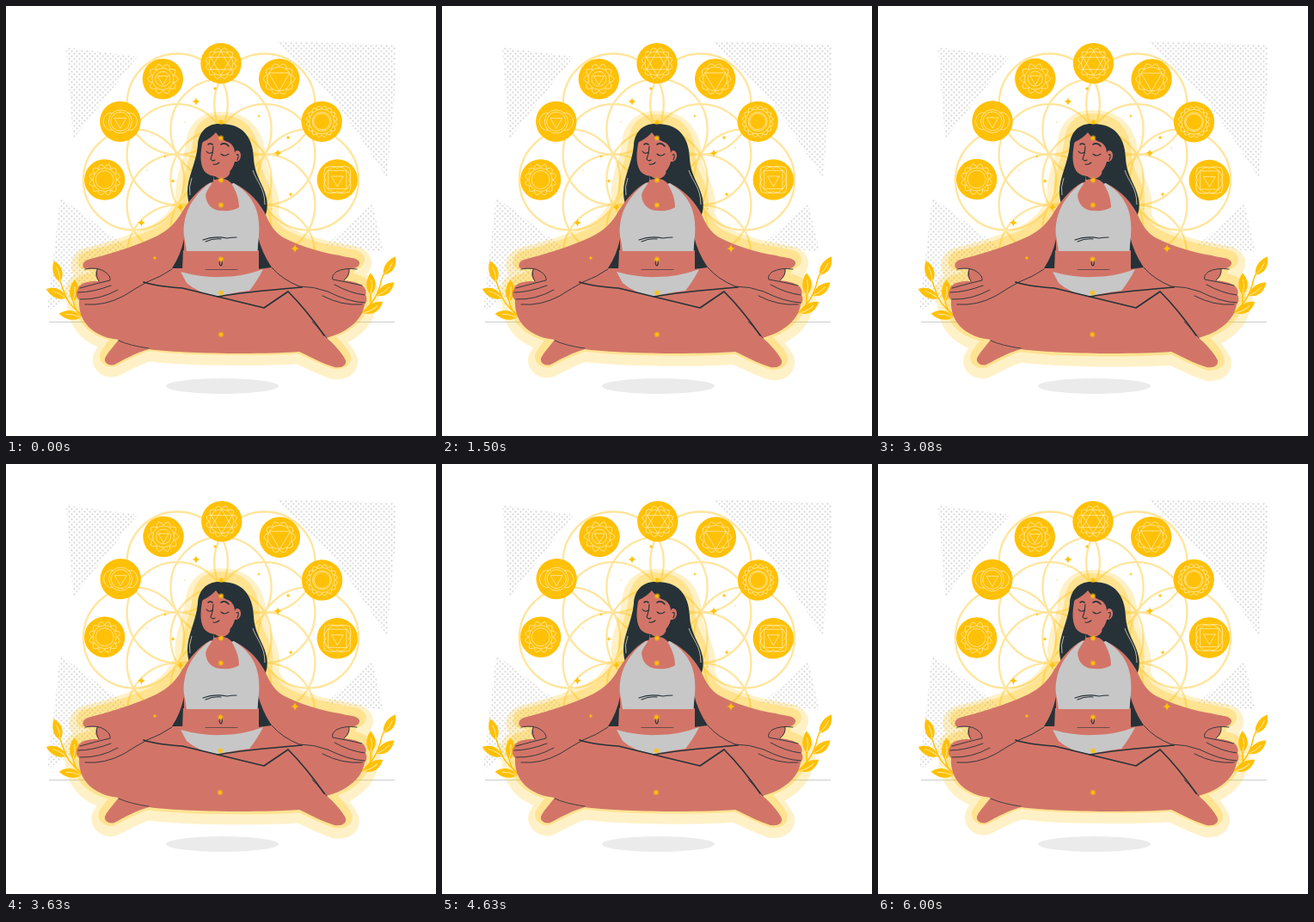
Animation of 500x500 px, one loop 6.04 s. Source, as an HTML page:

```html
<!DOCTYPE html>
<html lang="en">
<head>
<meta charset="utf-8">
<title>Meditation</title>
<style>
  html, body { margin: 0; width: 100%; height: 100%; overflow: hidden; background: #fff; }
  svg { display: block; width: 100%; height: 100%; }
  .line { fill: none; stroke: #263238; stroke-linecap: round; stroke-linejoin: round; }
</style>
</head>
<body>
<svg viewBox="0 0 500 500">
  <defs>
    <pattern id="dots" width="6" height="6" patternUnits="userSpaceOnUse">
      <circle cx="1.5" cy="1.5" r="1.15" fill="#dadada"/>
      <circle cx="4.5" cy="4.5" r="1.15" fill="#dadada"/>
    </pattern>
    <path id="hair" d="M250 137C233 136 224 147 223 162C221 183 211 199 211 216C211 228 216 238 215 250L296 252C303 246 305 234 303 224C300 208 289 198 288 177C287 151 274 137 250 137Z"/>
    <path id="body" d="M238 205C224 212 211 228 202 244C194 256 184 264 170 270C148 280 119 289 95 295C89 297 88 303 91 305C96 307 101 305 106 306C103 310 103 315 108 320C100 320 92 320 86 325C84 326 84 328 84 329C81 332 81 338 85 342C84 360 93 374 107 381C114 385 122 387 131 388C125 396 118 403 115 410C114 415 120 419 126 417C139 410 152 403 166 399C212 405 300 405 341 402C356 409 369 416 382 420C391 421 396 418 395 412C390 402 381 393 373 386C397 379 414 366 417 347C420 344 420 339 418 336C420 331 417 327 414 325C408 321 401 320 393 319C399 315 400 310 399 306C405 306 412 303 411 298C409 292 397 293 388 290C368 287 341 279 324 270C309 262 305 248 300 239C291 223 277 211 262 205Z"/>
    <g id="leaf">
      <path d="M0 0C-6-6-6-15-1-23C6-16 7-7 0 0Z" fill="#ffc107"/>
      <path d="M0-1Q2-9 0-16" fill="none" stroke="#ffe9a8" stroke-width=".8"/>
    </g>
  </defs>

  <path fill="url(#dots)" d="M70 48L153 59L78 155ZM314 41L453 45V90L443 200L383 110ZM63 222L145 284L120 310L48 355ZM426 230L439 286L372 278Z"/>
  <path d="M50 367.5H452" stroke="#a5abad" stroke-width=".6"/>
  <ellipse cx="251.5" cy="442" rx="65.5" ry="9" fill="#ebebeb"/>
  <g id="flower" fill="none" stroke="#ffe59c" stroke-width="2.3"/>
  <g id="wheel"/>

  <g id="aura" stroke-linejoin="round">
    <g opacity=".22" fill="#ffc107" stroke="#ffc107" stroke-width="28">
      <use href="#body"/><use href="#hair"/>
    </g>
    <g opacity=".28" fill="#ffc107" stroke="#ffc107" stroke-width="12" transform="translate(0 -4)">
      <use href="#body"/><use href="#hair"/>
    </g>
  </g>
  <path d="M96 364Q76 352 70 339Q66 329 63 320M88 361Q79 353 78 342M410 360Q429 346 435 325Q437 316 439 312M424 347V335" fill="none" stroke="#ffc107" stroke-width="1.5"/>
  <g id="leaves"/>

  <use href="#hair" fill="#263238"/>
  <path d="M287 191C291 204 301 211 301 231M216 200Q212 211 214 220" fill="none" stroke="#fff1c6" stroke-width=".7"/>
  <use href="#body" fill="#d27568"/>
  <path d="M207 271Q203 290 193 305H207V284ZM293 268Q297 286 309 304L293 306Z" fill="#263238"/>
  <path d="M206 284H294V306Q250 309 205 308Z" fill="#d27568"/>
  <path d="M203 309Q228 316 250 315Q275 315 299 306Q292 320 283 331Q260 334 246 338Q222 333 210 322Z" fill="#c7c7c7"/>
  <path d="M237 206C225 214 213 229 209 244C206 256 206 264 208 272L210 285H292C294 272 296 255 292 240C288 225 278 214 265 206Z" fill="#c7c7c7"/>
  <path d="M243 190L241 203C238 210 234 212 232 220C233 232 241 238 251 238Q264 239 271 234C271 222 266 213 261 204L260 188Z" fill="#d27568"/>
  <path d="M242 197C249 204 257 201 260 195L266 190L270 196L263 207Q258 201 252 201Q246 201 242 202Z" fill="#263238"/>
  <path d="M229 155C226 170 225 182 230 191C235 199 248 200 257 195Q264 190 266 181C274 182 276 169 268 167L262 150L243 145Z" fill="#d27568"/>
  <path d="M226 163C226 151 233 143 244 141C255 141 275 151 272 169Q267 166 266 171Q266 163 260 159Q249 155 244 147Q238 154 229 158Z" fill="#263238"/>

  <g class="line" stroke-width="1.1">
    <path d="M233 169Q236 173 240 170M250 172Q254 176 259 172M241 163Q241 171 238 178Q240 181 243 179M241 184Q245 185 248 182M268 173Q272 171 269 179"/>
    <path d="M235 161Q237 159 240 161M250 161Q255 158 259 163" stroke-width="1.6"/>
    <path d="M229 272Q242 267 257 270Q262 269 268 269M232 274Q241 270 250 271"/>
    <path d="M232 306.5H269" stroke-width=".6"/>
    <path d="M249 295Q247 301 250 302Q252 300 251 295"/>
    <path d="M160 321Q174 326 205 328L300 351L328 332Q349 353 370 383" stroke-width="1.7"/>
    <path d="M246 338Q273 333 344 327" stroke-width="1.7"/>
    <path d="M131 389Q144 395 166 398M373 386Q367 378 356 367" stroke-width=".8"/>
  </g>
  <g class="line" stroke-width=".9">
    <path d="M92 306Q107 303 115 309Q122 314 121 319Q108 322 86 328M106 306Q104 314 108 320M84 333Q101 333 122 325M86 341Q109 342 130 330M92 347Q115 349 137 337Q151 328 164 321M193 306Q180 315 164 321"/>
    <path d="M408 306Q394 304 384 309Q378 314 380 318Q397 321 414 325M399 306Q400 313 393 319M417 336Q400 334 382 324M417 345Q398 344 374 332Q358 326 341 326M414 347Q391 349 368 337M309 304Q321 318 341 326"/>
  </g>

  <g id="sparkles" fill="#ffc107"/>
  <g id="points"/>
</svg>
<script>
  const GOLD = '#ffc107', CX = 250, CY = 202;
  const LOOP = 6040, FRAME = 1000 / 24, SWAY = 1500;
  const $ = id => document.getElementById(id);
  const range = n => Array.from({ length: n }, (_, i) => i);
  const polar = (r, deg) => {
    const a = deg * Math.PI / 180;
    return [r * Math.sin(a), -r * Math.cos(a)].map(v => v.toFixed(2)).join(' ');
  };
  const circle = (x, y, r, extra = '') => `<circle cx="${x}" cy="${y}" r="${r}" ${extra}/>`;
  const ring = r => circle(0, 0, r);
  const polygon = (n, r, start = 0) =>
    `<path d="M${range(n).map(i => polar(r, start + i * 360 / n)).join('L')}Z"/>`;
  const petals = (n, inner, outer) => {
    const step = 360 / n, bulge = (inner + 2 * outer) / 3;
    const curves = range(n).map(i =>
      `Q${polar(bulge, (i + .08) * step)} ${polar(outer, (i + .5) * step)}` +
      `Q${polar(bulge, (i + .92) * step)} ${polar(inner, (i + 1) * step)}`);
    return `<path d="M${polar(inner, 0)}${curves.join('')}Z"/>`;
  };

  // Seed circle, its six neighbours, and the six gaps around them
  const R = 58.6;
  $('flower').innerHTML = circle(CX, CY, R) + range(6).map(i =>
    [[R, i * 60], [R * Math.sqrt(3), i * 60 + 30]].map(([d, a]) => {
      const [x, y] = polar(d, a).split(' ').map(Number);
      return circle(CX + x, CY + y, R);
    }).join('')).join('');

  const symbols = [
    petals(12, 14, 18.5) + ring(13.5) + ring(10.5),
    ring(13.5) + ring(11) + polygon(3, 8, 180) +
      '<path d="M-9-10Q-18-11-20 0Q-18 11-9 10M9-10Q18-11 20 0Q18 11 9 10"/>',
    petals(10, 13, 18) + ring(12.5) + ring(8.5) + polygon(3, 7, 180),
    petals(12, 14.5, 18.5) + ring(14) + polygon(3, 14) + polygon(3, 14, 180),
    petals(10, 14.5, 18.5) + ring(14) + polygon(3, 14, 180),
    petals(16, 15, 18.5) + ring(14.5) + ring(11) + ring(9.5),
    petals(4, 13, 20) + ring(15.5) + polygon(4, 15, 45) + polygon(3, 8, 180)
  ];
  $('wheel').innerHTML = symbols.map((symbol, i) =>
    `<g transform="translate(${CX} ${CY}) translate(${polar(135.3, i * 30 - 90)})">` +
    circle(0, 0, 23.7, `fill="${GOLD}"`) +
    `<g fill="none" stroke="#fff" stroke-width=".7" opacity=".75">${symbol}</g></g>`).join('');

  $('points').innerHTML = [135, 153.5, 202.5, 231.5, 294.5, 333.5, 382].map(y =>
    circle(CX, y, 3.2, `fill="${GOLD}" opacity=".45"`) + circle(CX, y, 2, `fill="${GOLD}"`)).join('');

  // Base x, base y, lean
  const leaves = [
    [63, 321, -14], [70, 340, -62], [78, 344, 6], [87, 362, -78],
    [439, 313, 35], [424, 336, 2], [431, 337, 55], [416, 357, 62]
  ];
  $('leaves').innerHTML = leaves.map(([x, y, lean]) =>
    `<use href="#leaf" transform="translate(${x} ${y}) rotate(${lean}) scale(1.12)"/>`).join('');

  const sparkles = [
    [221, 111, 4.8], [316, 171, 4.8], [157.5, 252, 4.8], [336, 282, 5], [203, 234, 4.5],
    [243, 96, 2.5], [294, 128, 2], [185, 175, 2], [194, 203.5, 2.6], [173, 293, 2.6],
    [328, 153, 2.6], [331, 219, 2.6], [208, 135, 1], [309, 236, 1.2], [164, 191, 1], [341, 165, 1]
  ];
  $('sparkles').innerHTML = sparkles.map(([x, y, s]) => {
    const k = s * .12;
    return `<path transform="translate(${x} ${y})" d="M0 ${-s}Q${k} ${-k} ${s} 0Q${k} ${k} 0 ${s}Q${-k} ${k} ${-s} 0Q${-k} ${-k} 0 ${-s}Z"/>`;
  }).join('');

  // 0° → 1° → -1° → 0°, linear
  const swayAngle = p => p < .25 ? 4 * p : p < .75 ? 2 - 4 * p : 4 * p - 4;

  function draw(time) {
    const t = Math.floor(((time % LOOP) + 5) / FRAME) * FRAME;
    const turn = `rotate(${swayAngle((t % SWAY) / SWAY)} ${CX} ${CY})`;
    $('wheel').setAttribute('transform', turn);
    $('points').setAttribute('transform', turn);
    const swell = 1 + .012 * Math.sin(Math.PI * t / 6000) ** 2;
    $('aura').setAttribute('transform', `translate(250 290) scale(${swell}) translate(-250 -290)`);
  }

  const start = performance.now();
  function tick() {
    draw(performance.now() - start);
    requestAnimationFrame(tick);
  }
  tick();
</script>
</body>
</html>
```
